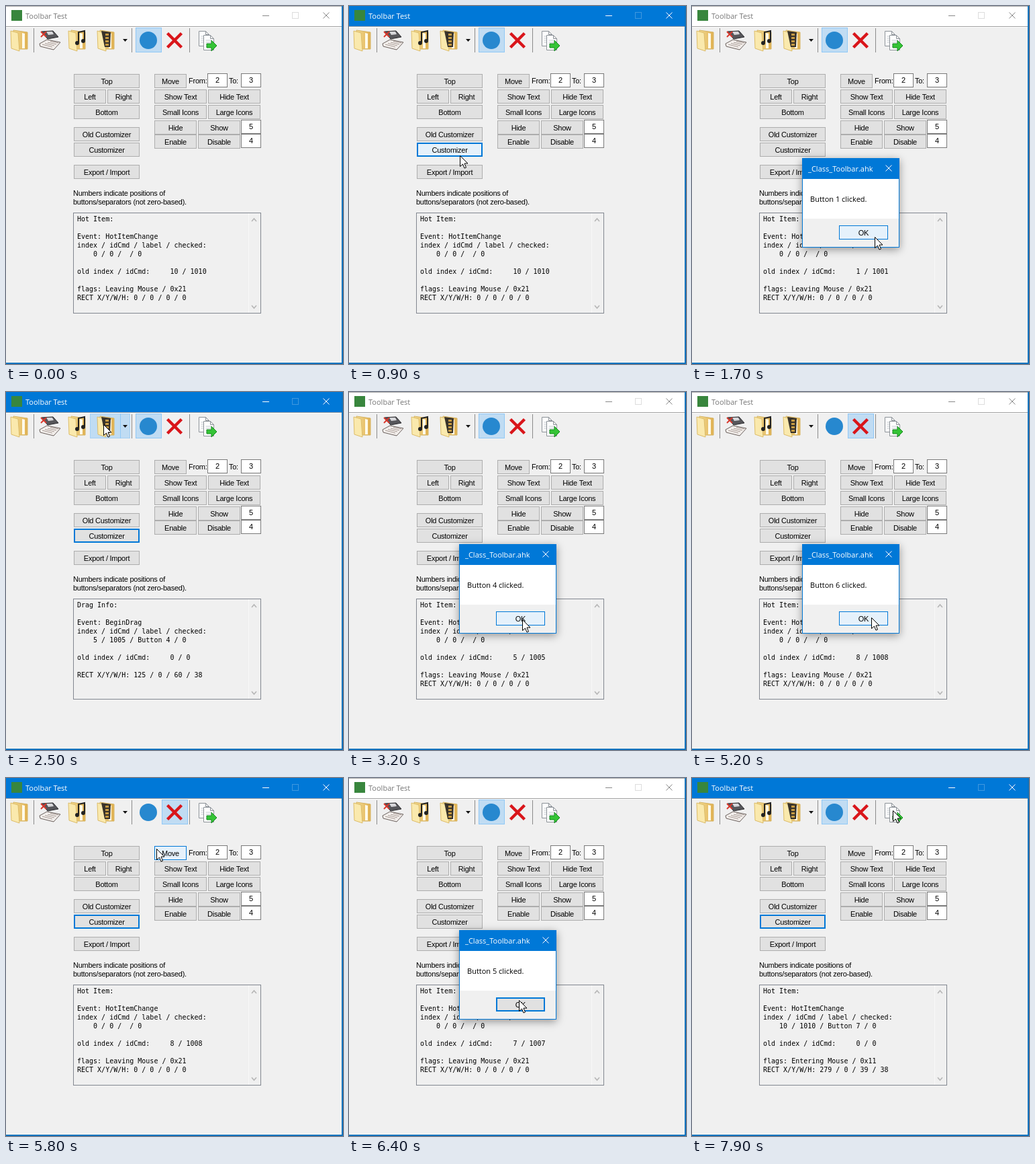
An HTML page with a canvas for the animation above (8 s loop, 502x532 px).

```html
<!DOCTYPE html>
<html lang="en">
<head>
<meta charset="utf-8">
<title>Toolbar Test</title>
<style>
html, body { margin: 0; width: 100%; height: 100%; overflow: hidden; background: #f0f0f0; }
canvas { display: block; }
</style>
</head>
<body>
<canvas id="stage" width="502" height="532"></canvas>
<script>
const g = document.getElementById('stage').getContext('2d');
const LOOP = 8000, STEP = 100, BLUE = '#0078d7';
const UI = '11px "Liberation Sans", Arial, sans-serif';
const SEGOE = '11px "Open Sans", sans-serif';
const MONO = '10px "DejaVu Sans Mono", monospace';

// toolbar: seven buttons, separators after some; separators count as positions
const tools = [], separators = [];
for (let n = 1, x = 0, index = 1; n <= 7; n++, index++) {
  const w = n === 4 ? 60 : 39;
  tools.push({ n, index, x, w });
  x += w;
  if (n === 1 || n === 4 || n === 6) {
    separators.push(x + 2.5);
    x += 8;
    index++;
  }
}

const buttons = [];
const row = (x, y, w, ...labels) =>
  labels.forEach((label, i) => buttons.push({ x: x + i * (w + 2), y, w, h: 21, label }));
row(101, 101, 98, 'Top');
row(101, 124, 48, 'Left', 'Right');
row(101, 147, 98, 'Bottom');
row(101, 180, 98, 'Old Customizer');
row(101, 203, 98, 'Customizer');
row(101, 236, 98, 'Export / Import');
row(221, 101, 48, 'Move');
row(221, 124, 78, 'Show Text', 'Hide Text');
row(221, 147, 78, 'Small Icons', 'Large Icons');
row(221, 170, 63, 'Hide', 'Show');
row(221, 191, 63, 'Enable', 'Disable');
const ok = { x: 219, y: 326, w: 73, h: 21, label: 'OK' };

// each visit: pointer reaches button n, message box opens, pointer reaches OK, box closes
const visit = (n, arrive, open, confirm, close, x, y) =>
  ({ n, arrive, open, confirm, close, ok: [x, y], tool: [tools[n - 1].x + 20, 48] });
const visits = [
  visit(7, -100, 100, 600, 700, 262, 338),
  visit(1, 1200, 1300, 1600, 1800, 272, 343),
  visit(4, 2400, 2700, 3100, 3300, 258, 338),
  visit(6, 4000, 4400, 5100, 5400, 267, 335),
  visit(5, 5900, 6000, 6400, 6700, 253, 330),
  visit(7, LOOP - 100, LOOP + 100, LOOP + 600, LOOP + 700, 262, 338)
];

function glide(a, b, t, t0, t1) {
  const p = Math.min(1, Math.max(0, (t - t0) / (t1 - t0)));
  return a.map((v, i) => Math.round(v + (b[i] - v) * p));
}

function pointer(t) {
  const i = Math.max(0, visits.findIndex(v => t < v.close));
  const v = visits[i], before = visits[i - 1];
  if (t < v.arrive && before) return glide(before.ok, v.tool, t, before.close, v.arrive);
  return glide(v.tool, v.ok, t, Math.max(v.open, v.confirm - 500), v.confirm);
}

const openBox = t => visits.find(v => t >= v.open && t < v.close);
const lastOpened = t => visits.filter(v => v.open <= t).pop() || visits[0];
const isActive = t => t >= 100 && !openBox(t);
const inside = ([px, py], { x, y = 32, w, h = 38 }) =>
  px >= x && px < x + w && py >= y && py < y + h;
const hotTool = t => isActive(t) ? tools.find(b => inside(pointer(t), b)) : null;
const isDragging = t => t >= visits[2].arrive + STEP && t < visits[2].open;

function box(x, y, w, h, fill, stroke, line = 1) {
  g.fillStyle = fill;
  g.fillRect(x, y, w, h);
  if (!stroke) return;
  g.strokeStyle = stroke;
  g.lineWidth = line;
  g.strokeRect(x + line / 2, y + line / 2, w - line, h - line);
}

function text(s, x, y, font = UI, color = '#000', align = 'left') {
  g.font = font;
  g.letterSpacing = font === UI ? '-0.25px' : '0px';
  g.fillStyle = color;
  g.textAlign = align;
  g.fillText(s, x, y);
}

function line(points, color, width = 1) {
  g.strokeStyle = color;
  g.lineWidth = width;
  g.beginPath();
  points.forEach(([x, y]) => g.lineTo(x, y));
  g.stroke();
}

// shapes are written as SVG paths relative to x, y
function shape(x, y, d, fill, stroke, width = 1) {
  const path = new Path2D(d);
  g.save();
  g.translate(x, y);
  g.fillStyle = fill;
  g.fill(path);
  g.strokeStyle = stroke || fill;
  g.lineWidth = width;
  if (stroke) g.stroke(path);
  g.restore();
}

function disc(x, y, r, fill) {
  g.fillStyle = fill;
  g.beginPath();
  g.arc(x, y, r, 0, 7);
  g.fill();
}

function cross(x, y, size, color, width = 1) {
  line([[x, y], [x + size, y + size]], color, width);
  line([[x + size, y], [x, y + size]], color, width);
}

function button(b, hover, focus) {
  box(b.x, b.y, b.w, b.h, hover ? '#e5f1fb' : '#e1e1e1',
    hover || focus ? BLUE : '#adadad', focus ? 2 : 1);
  text(b.label, b.x + b.w / 2, b.y + b.h / 2 + 4.5, UI, '#000', 'center');
}

function folder(x) {
  const shade = g.createLinearGradient(0, 0, 26, 0);
  shade.addColorStop(0, '#f8e4a0');
  shade.addColorStop(1, '#dfae4e');
  shape(x, 36, 'M4 0L25 3V28H9L4 25Z', shade, '#d6b462');
  shape(x, 36, 'M17 4L21 5V27H17Z', '#fffbea');
  shape(x, 36, 'M0 1L11 4L13 31L1 27Z', '#fae9ad', '#dcbc69');
}

function page(x, y) {
  shape(x, y, 'M0 0H10L15 5V22H0Z M10 0V5H15', '#fff', '#8c9298');
  for (let i = 0; i < 4; i++) box(x + 3, y + 7 + i * 3, 9, 1, '#c1c8ce');
}

function icons() {
  folder(7);
  // disk above its drive
  shape(50, 50, 'M0 6L11 0L31 4L21 15L1 10Z', '#f3efec', '#695f5b');
  for (let i = 0; i < 4; i++) line([[54 + i * 4, 57 - i * 1.5], [69 + i * 3, 61 - i * 2]], '#a89b95');
  shape(53, 37, 'M0 1L17 0L25 9L9 12Z', '#57575b', '#29292c');
  shape(60, 38, 'M0 0H9L11 4L3 5Z', '#d7d7da');
  cross(52, 38, 8, '#d8382c', 2);

  folder(93);
  shape(108, 37, 'M0 17V2L9 0V14', 'rgba(0,0,0,0)', '#222', 2);
  disc(106, 55, 3, '#222');
  disc(115, 52, 3, '#222');

  folder(136);
  shape(142, 37, 'M0 0L14 2L13 24H5Z', '#39332a');
  for (let i = 0; i < 4; i++) box(148, 41 + i * 5, 5, 3, '#c69b43');
  shape(174, 49, 'M0 0H7L3.5 4Z', '#111');

  disc(212, 51, 13, '#2788cf');
  cross(240.5, 40.5, 21, '#d9151a', 4.5);

  page(287.5, 37.5);
  page(294.5, 43.5);
  shape(299, 51, 'M0 5H7V0L15 8L7 16V11H0Z', '#35c436', '#178b20');
}

function titleBar(on) {
  const ink = on ? '#fff' : '#888';
  box(0, 0, 502, 30, on ? BLUE : '#fff');
  if (!on) box(0, 0, 502, 1, '#aaa');
  box(0, 30, 502, 1, '#a0a0a0');
  box(0, 31, 502, 1, '#fff');
  box(8, 6, 16, 16, '#38863d');
  text('Toolbar Test', 29, 18.5, SEGOE, on ? '#fff' : '#777');
  box(382, 14, 10, 1, ink);
  g.strokeStyle = on ? '#3f98df' : '#ddd';
  g.lineWidth = 1;
  g.strokeRect(426.5, 9.5, 9, 9);
  cross(472.5, 9.5, 9, ink);
}

function toolbar(t) {
  const checked = lastOpened(t).n === 6 ? 6 : 5;
  const hot = hotTool(t - STEP) && hotTool(t);
  for (const b of tools) {
    if (b.n === checked) box(b.x, 32, b.w, 37, '#c0dcf3', '#90c8f6');
    else if (b === hot) box(b.x, 32, b.w, 37, isDragging(t) ? '#c0dcf3' : '#cce4f7', '#a5d0f4');
  }
  if (hot && hot.n === 4) line([[170.5, 32], [170.5, 69]], '#90c8f6');
  separators.forEach(x => line([[x, 33], [x, 69]], '#8b8b8b'));
  icons();
}

function info(t) {
  const hot = hotTool(t), drag = hot && isDragging(t);
  const old = tools[lastOpened(t).n - 1];
  const id = b => `${b.index} / ${1000 + b.index}`;
  const rows = [
    drag ? 'Drag Info:' : 'Hot Item:', '',
    'Event: ' + (drag ? 'BeginDrag' : 'HotItemChange'),
    'index / idCmd / label / checked:',
    '    ' + (hot ? `${id(hot)} / Button ${hot.n} / 0` : '0 / 0 /  / 0'), '',
    'old index / idCmd:     ' + (hot ? '0 / 0' : id(old)), ''
  ];
  if (!drag) rows.push('flags: ' + (hot ? 'Entering Mouse / 0x11' : 'Leaving Mouse / 0x21'));
  rows.push('RECT X/Y/W/H: ' + (hot ? `${hot.x} / 0 / ${hot.w} / 38` : '0 / 0 / 0 / 0'));

  box(100, 307, 280, 150, '#f0f0f0', '#828790');
  box(361, 308, 1, 148, '#f8f8f8');
  for (const [y, dy] of [[320, -4], [445, 4]]) {
    line([[366, y], [369.5, y + dy], [373, y]], '#b5b5b5', 1.5);
  }
  rows.forEach((s, i) => text(s, 106, 320 + i * 13, MONO));
}

function field(x, y, value) {
  box(x, y, 30, 21, '#fff', '#7a7a7a');
  text(value, x + 15, y + 14, UI, '#000', 'center');
}

function form(t) {
  const on = isActive(t);
  buttons.forEach(b => button(b, on && inside(pointer(t), b), on && b.label === 'Customizer'));
  field(300, 100, '2');
  field(350, 100, '3');
  field(350, 169, '5');
  field(350, 190, '4');
  text('From:', 272, 115);
  text('To:', 332, 115);
  text('Numbers indicate positions of', 100, 282);
  text('buttons/separators (not zero-based).', 100, 295);
}

function messageBox(t, v) {
  g.save();
  g.shadowColor = 'rgba(0,0,0,.4)';
  g.shadowBlur = 12;
  g.shadowOffsetY = 3;
  box(164, 226, 145, 133, BLUE);
  g.restore();
  box(165, 257, 143, 59, '#fff');
  box(165, 316, 143, 42, '#f0f0f0');
  text('_Class_Toolbar.ahk', 173, 246, SEGOE, '#fff');
  cross(288.5, 236.5, 9, '#fff');
  text(`Button ${v.n} clicked.`, 176, 291, SEGOE);
  const over = t > v.confirm || inside(pointer(t - STEP), ok);
  button(ok, over, !over);
}

function draw(t) {
  box(0, 0, 502, 532, '#f0f0f0');
  titleBar(isActive(t));
  toolbar(t);
  form(t);
  info(t);
  box(500, 0, 2, 532, '#0d72bd');
  box(0, 530, 502, 2, '#0d72bd');
  const v = openBox(t);
  if (v) messageBox(t, v);
  if (t < 100) return;
  const [x, y] = pointer(t);
  shape(x + .5, y + .5, 'M0 0V16L4 12.5L6.5 18.5L9 17.5L6.5 11.5H11.5Z', '#fff', '#000');
}

const start = performance.now();
function tick() {
  const t = (performance.now() - start) % LOOP;
  draw(Math.floor(t / STEP) * STEP);
  requestAnimationFrame(tick);
}
tick();
</script>
</body>
</html>
```
